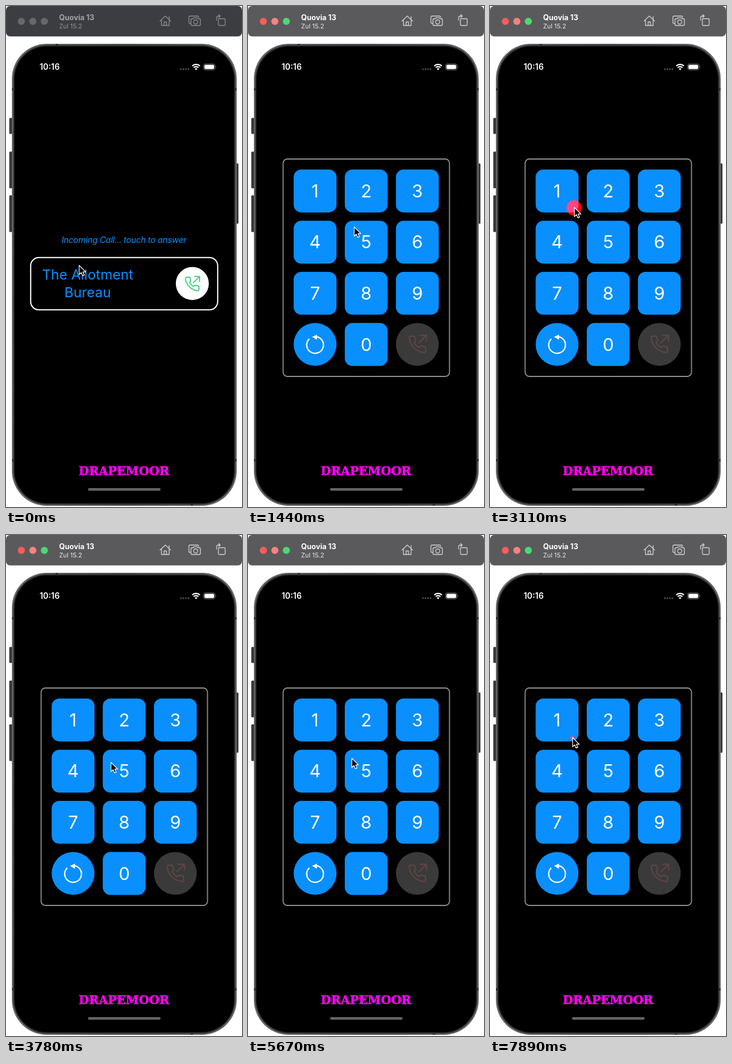
These frames come from a looping animation (400x848 px, 8 s). An HTML page:

```html
<!DOCTYPE html>
<html lang="en">
<head>
<meta charset="utf-8">
<title>Call and keypad</title>
<style>
  html, body { margin: 0; width: 100%; height: 100%; overflow: hidden; background: #fff; }
  svg { display: block; width: 100%; height: 100%; }
  text { font-family: Inter, "Open Sans", sans-serif; }
  .line { fill: none; stroke-linecap: round; stroke-linejoin: round; }
</style>
</head>
<body>
<svg id="stage" viewBox="0 0 400 848">
  <defs>
    <linearGradient id="steel">
      <stop offset="0" stop-color="#666668"/>
      <stop offset=".5" stop-color="#4a4a4c"/>
      <stop offset="1" stop-color="#666668"/>
    </linearGradient>
    <g id="phone" class="line">
      <path d="M22 16.92v3a2 2 0 0 1-2.18 2 19.79 19.79 0 0 1-8.63-3.07 19.5 19.5 0 0 1-6-6 19.79 19.79 0 0 1-3.07-8.67A2 2 0 0 1 4.11 2h3a2 2 0 0 1 2 1.72 12.84 12.84 0 0 0 .7 2.81 2 2 0 0 1-.45 2.11L8.09 9.91a16 16 0 0 0 6 6l1.27-1.27a2 2 0 0 1 2.11-.45 12.84 12.84 0 0 0 2.81.7A2 2 0 0 1 22 16.92z"/>
      <path d="M14 10L23 1M15.7 1H23V8.3"/>
    </g>
  </defs>
  <rect width="400" height="848" fill="#fff"/>

  <rect id="bar" width="400" height="51.5" rx="7"/>
  <g id="lights"><circle cx="26" cy="26" r="6"/><circle cx="45.5" cy="26" r="6"/><circle cx="65" cy="26" r="6"/></g>
  <g id="heading">
    <text x="90" y="24" font-size="12.5" font-weight="700">Quovia 13</text>
    <text x="90" y="38" font-size="10.8" opacity=".85">Zul 15.2</text>
  </g>
  <g id="tools" class="line" stroke-width="1.3">
    <path d="M261 25.5L270 17L279 25.5M263.5 24V33H276.5V24M268 33V27H272V33M276.5 18V22"/>
    <path d="M312.5 29.500H312a2 2 0 0 1-2-2V19a2 2 0 0 1 2-2H324.500a2 2 0 0 1 2 2"/>
    <path d="M316 21.500H317.500L319 19.800H324L325.500 21.500H327.500a2 2 0 0 1 2 2V31a2 2 0 0 1-2 2H315.500a2 2 0 0 1-2-2V23.500a2 2 0 0 1 2-2Z"/>
    <circle cx="321.500" cy="27" r="3.500"/>
    <rect x="360" y="21.500" width="11.500" height="11.500" rx="1.500"/>
    <path d="M357 24V20a3 3 0 0 1 3-3H363M360.500 14.500L363.200 17L360.500 19.500"/>
  </g>

  <g fill="#38383a">
    <rect x="5.500" y="189.500" width="7" height="27" rx="1.500"/>
    <rect x="5.500" y="246.500" width="7" height="62" rx="1.500"/>
    <rect x="5.500" y="320.500" width="7" height="62" rx="1.500"/>
    <rect x="388" y="266.500" width="6" height="102" rx="1.500"/>
  </g>
  <rect x="10" y="64" width="381" height="782" rx="59" fill="url(#steel)"/>
  <rect x="12.500" y="66.500" width="376" height="777" rx="57" fill="#29292b"/>
  <rect x="14.500" y="68.500" width="372" height="773" rx="55" fill="#000"/>
  <path d="M10 141H14M387 141H391M10 769H14M387 769H391M86 64V68M315 842V846" stroke="#303032" stroke-width="4"/>

  <text x="74" y="108" font-size="13.800" font-weight="600" fill="#fff" text-anchor="middle">10:16</text>
  <path d="M296.500 107H311" stroke="#555" stroke-width="2.800" stroke-linecap="round" stroke-dasharray="0 4.200"/>
  <g fill="none" stroke="#fff" stroke-width="2.200">
    <path d="M315.700 101.500A9.200 9.200 0 0 1 328.700 101.500M318.200 104.300A5.700 5.700 0 0 1 326.200 104.300"/>
  </g>
  <path d="M322.200 108.800L319.900 106.300A3.300 3.300 0 0 1 324.500 106.300Z" fill="#fff"/>
  <rect x="334.800" y="98" width="19.500" height="10.200" rx="3" fill="none" stroke="#777"/>
  <rect x="336.300" y="99.500" width="16.500" height="7.200" rx="1.800" fill="#fff"/>
  <path d="M355.700 101.500a2 2 0 0 1 0 3.200Z" fill="#777"/>

  <g id="call" text-anchor="middle" fill="#0a8fff">
    <text x="200" y="401" font-size="14.500" font-style="italic" letter-spacing="-.3">Incoming Call... touch to answer</text>
    <rect x="41.800" y="425.800" width="317" height="88.500" rx="14" fill="none" stroke="#fff" stroke-width="2"/>
    <text x="138.500" y="463" font-size="23.500">The Allotment</text>
    <text x="138.500" y="493" font-size="23.500">Bureau</text>
    <circle cx="315.800" cy="469.700" r="28" fill="#fff"/>
    <use href="#phone" transform="translate(301.700 456.700) scale(1.150)" stroke="#4fd080" stroke-width="1.700"/>
  </g>

  <g id="pad">
    <rect x="59.500" y="259" width="282" height="368" rx="7" fill="none" stroke="#8c8c8c" stroke-width="1.800"/>
    <g id="keys" fill="#0a8fff" font-size="30" text-anchor="middle"></g>
    <circle cx="113.700" cy="572.700" r="36.300" fill="#0a8fff"/>
    <path class="line" d="M114 559.500A14.200 14.200 0 1 1 103.300 564" stroke="#fff" stroke-width="2.200"/>
    <path d="M108.500 560L117 556.300V565Z" fill="#fff"/>
    <circle cx="287" cy="572.700" r="36.300" fill="#3a3a3a"/>
    <use href="#phone" transform="translate(270.200 556) scale(1.400)" stroke="#5d4544" stroke-width="1.600"/>
  </g>

  <text id="logo" x="200" y="793.700" font-size="20" font-weight="700" text-anchor="middle" fill="#f800ee" stroke="#f800ee" stroke-width=".7" style="font-family:'DejaVu Serif',serif">DRAPEMOOR</text>
  <rect x="139" y="816" width="123" height="4.600" rx="2.300" fill="#636363"/>

  <!-- Two blends: red on black, pink on colour -->
  <circle class="tap" fill="#ff8080" style="mix-blend-mode:multiply"/>
  <circle class="tap" fill="#f00" style="mix-blend-mode:screen"/>
  <path id="cursor" d="M0 0V15.500L3.600 12.200L6 17.600L8.800 16.400L6.400 11.200H11.200Z" fill="#000" stroke="#fff" stroke-width="1.200" stroke-linejoin="round"/>
</svg>
<script>
const LOOP = 8000, FPS = 9;
const $ = id => document.getElementById(id);
const taps = document.querySelectorAll(".tap");
const lights = [...$("lights").children];

// Cursor stops: step, x, y
const path = [
  [0, 124, 439], [1, 124, 439], [2, 150, 443], [3, 215, 455], [4, 270, 465], [5, 298, 469],
  [12, 298, 469], [13, 180, 374], [14, 150, 344], [15, 141, 334], [16, 140, 332],
  [20, 140, 332], [25, 143, 341], [30, 143, 341], [31, 150, 350], [32, 174, 375],
  [33, 188, 389], [34, 178, 385], [36, 176, 384], [42, 176, 384], [43, 158, 364],
  [44, 131, 338], [45, 132, 341], [49, 133, 342], [51, 176, 378], [52, 184, 384],
  [54, 180, 380], [56, 157, 360], [57, 144, 342], [62, 143, 341], [64, 152, 348],
  [67, 139, 342], [71, 140, 343]
];
const clicks = [7, 17, 27, 41, 45, 58, 68];
const radii = [20.8, 13, 7.5, 3.2];

function cursorAt(step) {
  const n = path.findIndex(p => p[0] >= step);
  const b = path[n], a = path[Math.max(0, n - 1)];
  const k = b === a ? 0 : (step - a[0]) / (b[0] - a[0]);
  return [a[1] + (b[1] - a[1]) * k, a[2] + (b[2] - a[2]) * k];
}

function tapRadius(step) {
  const start = clicks.findLast(c => c <= step);
  if (start === undefined || step === 44) return 0;
  return radii[step - start] || 0;
}

function buildKeys() {
  let out = "";
  for (let n = 0; n < 10; n++) {
    const slot = n ? n - 1 : 10;
    const x = 77.4 + slot % 3 * 86.65, y = 276.8 + Math.floor(slot / 3) * 86.6;
    out += `<rect x="${x}" y="${y}" width="72.6" height="72.6" rx="13"/>` +
      `<text x="${x + 36.3}" y="${y + 47}" fill="#fff">${n}</text>`;
  }
  $("keys").innerHTML = out;
}

function draw(ms) {
  const step = Math.floor((ms % LOOP + 4.5) * FPS / 1000) % (LOOP * FPS / 1000);
  const active = step >= 7;
  const ink = active ? "#cfcfd1" : "#8c8c8f";
  $("bar").setAttribute("fill", active ? "#5a5a5d" : "#3c3d41");
  $("heading").setAttribute("fill", active ? "#fff" : "#a4a4a7");
  $("tools").setAttribute("stroke", ink);
  ["#ff5c57", "#ff817d", "#4cd972"].forEach((c, i) =>
    lights[i].setAttribute("fill", active ? c : "#67686b"));

  const call = step < 7 ? 1 : step === 7 ? .45 : step === 8 ? .2 : 0;
  const pad = step < 9 ? 0 : step === 9 ? .5 : 1;
  $("call").setAttribute("opacity", call);
  $("pad").setAttribute("opacity", pad);
  $("logo").setAttribute("opacity", step === 9 ? .5 : 1);

  const [x, y] = cursorAt(step), r = tapRadius(step);
  $("cursor").setAttribute("transform", `translate(${x} ${y})`);
  taps.forEach(t => {
    t.setAttribute("cx", x - .5);
    t.setAttribute("cy", y + .8);
    t.setAttribute("r", r);
  });
}

buildKeys();
const begin = performance.now();
function tick() {
  draw(performance.now() - begin);
  requestAnimationFrame(tick);
}
tick();
</script>
</body>
</html>
```
